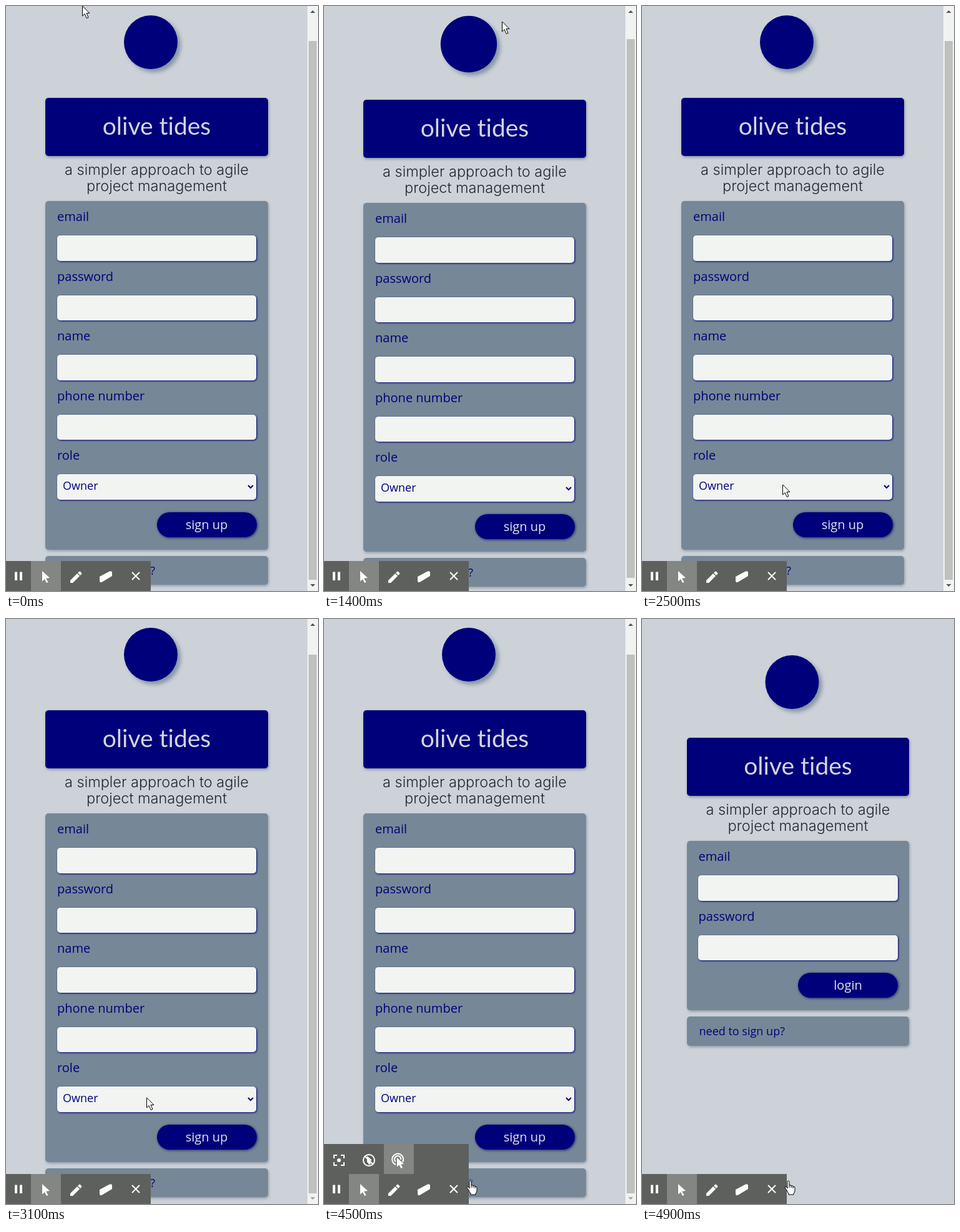
Recreate the animation shown at these times as an HTML page. Size 500 px wide and 936 px high, loop 5000 ms.

```html
<!DOCTYPE html>
<html lang="en">
<head>
<meta charset="utf-8">
<title>Sign up</title>
<style>
html, body { margin: 0; width: 100%; height: 100%; overflow: hidden; background: #cdd2d9; }
svg { display: block; width: 500px; height: 936px; }
text { font: 20px "Open Sans", sans-serif; fill: #00007b; }
.title { font: 39px Lato, sans-serif; fill: #d5d6dc; text-anchor: middle; font-variant-ligatures: none; }
.tagline { font: 300 23.5px Inter, sans-serif; fill: #24272c; text-anchor: middle; }
.small { font-size: 18px; }
.button { fill: #e4e6ea; text-anchor: middle; }
.logo { fill: #00007b; filter: drop-shadow(5px 5px 3px #8496a4); }
.navy { fill: #00007b; filter: drop-shadow(1px 2px 2px #8291a0); }
.panel { fill: #768897; filter: drop-shadow(1px 2px 2px #8c9aa6); }
.input { fill: #f1f4f1; filter: drop-shadow(1px 1px 1.5px #00007b); }
.pill { fill: #00007b; filter: drop-shadow(1px 1px 2px #20206a); }
.bar { fill: #5e605e; }
.lit { fill: #848684; }
.line { fill: none; stroke: #fff; stroke-width: 2; }
.cursor { fill: #fff; stroke: #000; stroke-linejoin: round; }
</style>
</head>
<body>
<svg viewBox="0 0 500 936">
  <g id="signup"></g>
  <g id="login"></g>
  <g id="scrollbar">
    <path d="M483 0h17v936h-17z" fill="#f1f3f2"/>
    <path id="thumb" d="M485 0h13v862h-13z" fill="#bfc1bf"/>
    <path d="M487.500 11l4-4 4 4z" fill="#505050"/>
    <path id="down" d="M487.500 925l4 4 4-4z"/>
  </g>
  <g id="extra">
    <path class="bar" d="M0 840h232v48H0z"/>
    <path class="lit" d="M96 840h48v48H96z"/>
    <path class="line" d="M16 863v-5h5M27 858h5v5M32 869v5h-5M21 874h-5v-5"/>
    <circle cx="24" cy="866" r="3" fill="#fff"/>
    <circle class="line" cx="72" cy="866" r="9"/>
    <path class="line" d="M65 859l14 14"/>
    <path d="M69 859l8 7-4 1 2 5-3 1-2-4-1 1z" fill="#fff"/>
    <path class="line" d="M115 873a9 9 0 1 1 11-4M115 868a5 5 0 1 1 8-3"/>
    <path d="M117 862l11 10-5 .5 3 5-2.500 1.500-3-5.500-3.500 3z" fill="#fff"/>
  </g>
  <g fill="#fff">
    <path class="bar" d="M0 888h232v48H0z"/>
    <path class="lit" d="M40 888h48v48H40z"/>
    <path d="M14 905.500h4v13.500h-4zM22 905.500h4v13.500h-4z"/>
    <path d="M58 904l12 11-6 .8 3.500 6-2.500 1.200-3-6-4 3.500z"/>
    <path d="M103 923v-4l11-11 4 4-11 11zM115 907l2-2q1-1 2 0l2 2q1 1 0 2l-2 2z"/>
    <path d="M150 913l15-8q5-2 5 2v5l-15 9q-5 3-5-2z"/>
    <path class="line" d="M202 906l12 12M214 906l-12 12"/>
  </g>
  <path id="arrow" class="cursor" d="M.5 0v16l3.700-3.500 3 7 2.800-1.200-3-6.800h5z"/>
  <g id="hand" class="cursor">
    <path d="M-2 12V1.500q0-1.500 1.500-1.500t1.500 1.500V7q3-1 3 1 3-1 3 1 3-.5 3 2v5q0 2-2 4v2H0v-2q-2-2-3-5l-3-4q0-3 4 0z"/>
    <path d="M1 7v4M4 8v3M7 9v3"/>
  </g>
</svg>
<script>
const $ = id => document.getElementById(id);

// One form page, moved by dx, dy; box edges snap to whole pixels.
function form(dx, dy, fields, action, hint, hintId) {
  const rect = (kind, x, y, w, h, r = 5) => {
    const [l, t, right, b] = [x + dx, y + dy, x + dx + w, y + dy + h].map(Math.round);
    return `<rect class="${kind}" x="${l}" y="${t}" width="${right - l}" height="${b - t}" rx="${r}"/>`;
  };
  const text = (kind, x, y, s, id = "") =>
    `<text class="${kind}" id="${id}" x="${x + dx}" y="${Math.round(y + dy)}">${s}</text>`;
  const field = (name, i) => {
    const y = 367 + i * 95.5;
    return text("", 82, y - 23, name) + rect("input", 81.7, y, 319.7, 40.8);
  };
  const end = 367 + fields.length * 95.5;
  return `<circle class="logo" cx="${232 + dx}" cy="${58 + dy}" r="43"/>` +
    rect("navy", 63.2, 147, 356.5, 93) + text("title", 241.5, 206, "olive tides") +
    text("tagline", 241.5, 270, "a simpler approach to agile") +
    text("tagline", 241.5, 296, "project management") +
    rect("panel", 63.2, 312, 356.5, end - 287) + fields.map(field).join("") +
    rect("pill", 241.7, end - 35, 159.9, 40, 20) + text("button", 321.5, end - 8, action) +
    rect("panel", 63.2, end + 35, 356.5, 46.8) + text("small", 83, end + 65, hint, hintId);
}

$("signup").innerHTML =
  form(0, 0, ["email", "password", "name", "phone number", "role"], "sign up", "already signed up?", "hint") +
  `<text class="small" x="91" y="774">Owner</text>
  <path d="M388 767l4 4 4-4" fill="none" stroke="#00007b" stroke-width="2"/>`;
$("login").innerHTML = form(8.5, 43, ["email", "password"], "login", "need to sign up?");
const logo = document.querySelector("#signup .logo");

// Keys: time, then values; linear in between.
const pointer = [[0, 122, 0], [200, 122, 0], [300, 120, -30], [1300, 290, -30], [1400, 285, 25],
  [1600, 220, 75], [1800, 130, 150], [2000, 136, 193], [2100, 136, 193], [2500, 225, 766],
  [3300, 225, 766], [3600, 238, 905], [3700, 239, 908], [3900, 235, 899]];
const zoom = [[800, 1], [1000, 1.05], [1500, 1.05], [1800, 1]];
const scroll = [[800, 0], [900, 3], [2200, 3], [2500, 0], [2700, 0], [2800, -1]];

function at(keys, t) {
  const i = keys.findIndex(k => k[0] > t);
  if (i < 0) return keys[keys.length - 1].slice(1);
  if (!i) return keys[0].slice(1);
  const a = keys[i - 1], b = keys[i], p = (t - a[0]) / (b[0] - a[0]);
  return a.slice(1).map((v, j) => v + (b[j + 1] - v) * p);
}
const show = (id, on) => $(id).style.display = on ? "" : "none";
const move = (id, x, y) => $(id).setAttribute("transform", `translate(${x} ${y})`);

function draw(now) {
  const t = Math.floor(now % 5000 / 100) * 100;
  const [x, y] = at(pointer, t).map(Math.round);
  const s = Math.round(at(scroll, t)[0]);
  const done = t >= 4600, hover = t >= 3600;
  show("signup", !done);
  show("scrollbar", !done);
  show("login", done);
  show("extra", t >= 3500 && !done);
  show("arrow", !hover);
  show("hand", hover);
  move("signup", 0, s);
  move("thumb", 0, 56 - s);
  move("arrow", x, y);
  move("hand", x, y);
  logo.setAttribute("r", 43 * at(zoom, t)[0]);
  $("hint").style.fill = hover ? "#3f62b4" : "";
  $("down").setAttribute("fill", s < 0 ? "#a3a3a3" : "#505050");
  requestAnimationFrame(draw);
}
requestAnimationFrame(draw);
</script>
</body>
</html>
```
